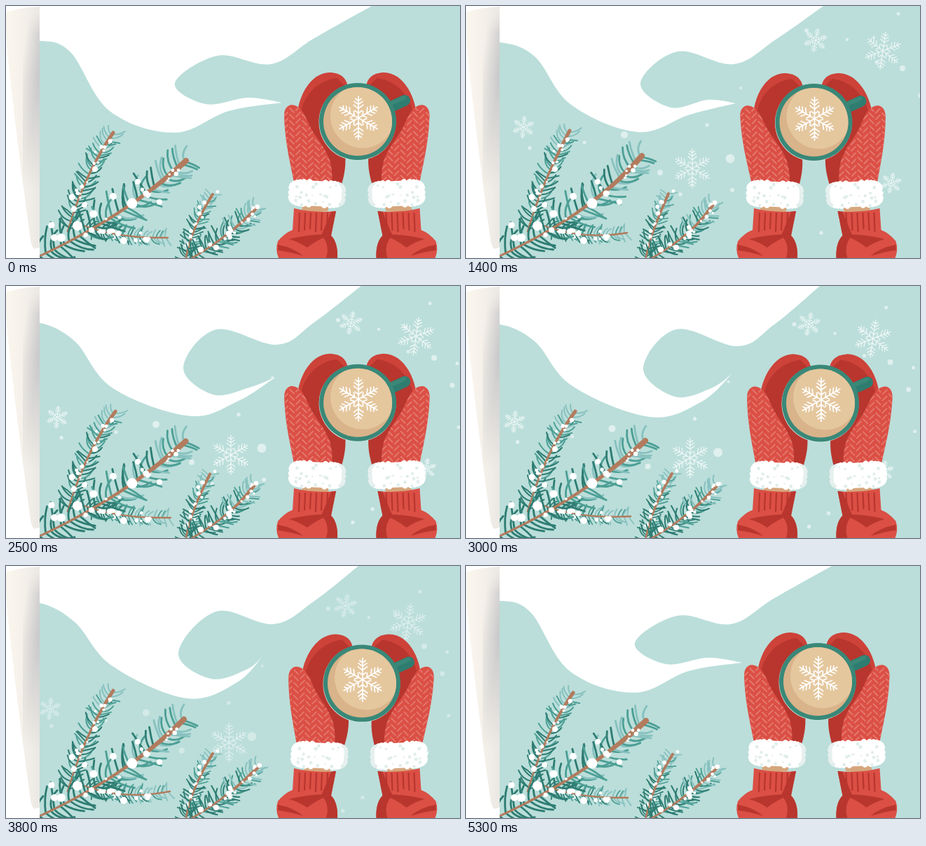
An HTML page with a canvas for the animation above (5.4 s loop, 648 by 360 pixels).

```html
<!DOCTYPE html>
<html lang="en">
<head>
<meta charset="utf-8">
<title>Winter cocoa</title>
<style>
html, body { margin: 0; width: 648px; height: 360px; overflow: hidden; background: #fff; }
canvas { display: block; }
</style>
</head>
<body>
<canvas id="stage" width="648" height="360"></canvas>
<script>
const ctx = document.getElementById('stage').getContext('2d');
const TAU = Math.PI * 2;
const SPAN = 5.3, LOOP = 5400, STEP = 100;
const TIMES = [0, 1.4, 2.1, 3, 3.8, 4.5];
const RED = '#db4f45', DARK_RED = '#b8362e', GREEN = '#398878';

// Steam outline: left y, lower edge, tip, upper edge, x where it leaves the top.
const STEAM = [
  [50, 92, 66, 148, 150, 240, 181, 318, 150, 394, 138, 345, 131, 285, 140, 241, 110, 302, 71, 378, 83, 440, 46, 522],
  [52, 98, 72, 150, 141, 245, 180, 320, 155, 385, 139, 345, 134, 292, 145, 249, 110, 302, 65, 382, 83, 442, 48, 510],
  [51, 98, 78, 152, 147, 258, 184, 325, 163, 388, 134, 345, 143, 292, 152, 252, 115, 300, 63, 385, 82, 440, 49, 508],
  [55, 98, 79, 152, 143, 262, 187, 335, 166, 380, 125, 350, 146, 298, 158, 253, 118, 300, 62, 388, 86, 440, 55, 505],
  [53, 98, 80, 152, 143, 258, 189, 330, 166, 369, 125, 345, 147, 292, 161, 246, 124, 300, 65, 382, 83, 440, 50, 503],
  [52, 98, 75, 148, 148, 250, 184, 322, 158, 377, 131, 335, 145, 285, 154, 244, 114, 295, 67, 380, 84, 440, 49, 508]
];
// Offsets (dx, dy): hands, then the tip of each branch.
const SWAY = [
  [0, 0, 0, 0, 0, 0, 0, 0, 0, 0, 0, 0],
  [-5.5, 1, -6, -7, -5, -3, -1, -7, -6, -1, -4, -6],
  [-3, 1.2, -1, 0, 2, -2, 3, 0, -6, 0, -4, -6],
  [4, 2.4, -1, 0, 3, -2, 4, -2, -1, -1, 1, -4],
  [6, 2.6, -3, -2, 0, -3, 3, -9, 0, -1, 3, -2],
  [3, 1.2, -2, -1, 0, -2, 2, -6, 0, -1, 1, -2]
];
// Curve, needle length, stroke, stem widths, needle pairs.
const BRANCHES = [
  { curve: [44, 359, 168, 302, 257, 221], len: 37, line: 2.8, stem: [3, 8], pairs: 33 },
  { curve: [88, 322, 112, 240, 153, 181], len: 23, line: 2, stem: [2.5, 5], pairs: 29 },
  { curve: [112, 314, 160, 332, 231, 331], len: 17, line: 1.8, stem: [2, 2.5], pairs: 26 },
  { curve: [256, 364, 264, 318, 295, 269], len: 17, line: 1.7, stem: [2.5, 4], pairs: 27 },
  { curve: [262, 362, 318, 330, 357, 289], len: 23, line: 2, stem: [2.5, 5], pairs: 28 }
];
const CLUMPS = [
  65, 313, 4.5, 79, 331, 6, 69, 331, 5, 102, 314, 7, 125, 297, 5.5, 112, 284, 4, 94, 273, 4.5,
  180, 282, 7.5, 200, 268, 4.5, 188, 251, 4, 153, 272, 5, 219, 280, 4, 160, 325, 4, 148, 322, 4,
  168, 335, 5, 122, 320, 4, 97, 290, 4, 127, 233, 4, 300, 345, 4, 278, 348, 4, 318, 325, 4
];
const FLAKES = [
  [595, 64, 27, -8.8, 7, .15], [499, 49, 17, -6, 3.3, .2], [323, 232, 28, -1.9, 8.5, 0],
  [82, 173, 16, -8, 13, .1], [607, 253, 15, -7, 7, .2]
];
const SPECKS = [
  486, 35, 3, 617, 11, 2.5, 544, 48, 2.2, 582, 45, 2, 623, 89, 4, 649, 128, 3.5, 377, 218, 6.5,
  226, 184, 5, 277, 238, 4, 380, 263, 3, 169, 195, 2.5, 91, 203, 2.7, 344, 170, 2.7, 392, 117, 2,
  507, 324, 2.7, 306, 269, 2.7, 658, 188, 2.5, 535, 305, 2.7, 656, 97, 2.5, 586, 80, 2.5
];

let seed = 7;
const random = (lo = 0, hi = 1) => {
  seed = (seed * 16807) % 2147483647;
  return lo + (hi - lo) * seed / 2147483647;
};

BRANCHES.forEach(b => {
  b.needles = [];
  for (let i = 0; i < b.pairs; i++) for (const side of [-1, 1]) {
    const s = (i + random()) / b.pairs, tone = s + random(-.4, .4);
    b.needles.push({
      s, side,
      len: b.len * random(.75, 1.1) * (1 - .25 * s * s),
      spread: (side < 0 ? 1.3 : 1) + random(-.2, .2),
      bend: random(-.1, .5),
      color: tone < .5 ? '#2d7c72' : tone < .85 ? '#4c9f95' : '#87c1bf'
    });
  }
  b.snow = Array.from({ length: 13 }, () =>
    ({ s: random(.25, 1), dx: random(-7, 7), dy: random(-6, 6), r: random(1.5, 3.4) }));
});
const fluff = Array.from({ length: 22 }, () => [random(412, 478), random(254, 284), random(1, 2.6)]);

// Smooth periodic interpolation of keyed number lists.
function track(keys, t) {
  const n = TIMES.length;
  const time = i => TIMES[(i + n) % n] + SPAN * Math.floor(i / n);
  const key = i => keys[(i + n) % n];
  let i = n - 1;
  while (TIMES[i] > t) i--;
  const h = time(i + 1) - time(i), u = (t - time(i)) / h;
  const slope = (k, j) => (key(k + 1)[j] - key(k - 1)[j]) / (time(k + 1) - time(k - 1)) * h;
  const e = u * u * (3 - 2 * u);
  return key(i).map((a, j) => a + (key(i + 1)[j] - a) * e +
    slope(i, j) * u * (1 - u) ** 2 - slope(i + 1, j) * u * u * (1 - u));
}

function fill(shape, color) {
  ctx.fillStyle = color;
  ctx.fill(typeof shape === 'string' ? new Path2D(shape) : shape);
}
function disc(x, y, r, color) {
  ctx.fillStyle = color;
  ctx.beginPath();
  ctx.arc(x, y, r, 0, TAU);
  ctx.fill();
}
function strokeLine(x1, y1, x2, y2) {
  ctx.beginPath();
  ctx.moveTo(x1, y1);
  ctx.lineTo(x2, y2);
  ctx.stroke();
}
function triples(list, draw) {
  for (let i = 0; i < list.length; i += 3) draw(list[i], list[i + 1], list[i + 2]);
}

// Curve through pts; the first and last points only set the end tangents.
function spline(pts) {
  for (let i = 1; i < pts.length - 2; i++) {
    const [a, b, c, d] = pts.slice(i - 1, i + 3);
    ctx.bezierCurveTo(b[0] + (c[0] - a[0]) / 5.7, b[1] + (c[1] - a[1]) / 5.7,
      c[0] - (d[0] - b[0]) / 5.7, c[1] - (d[1] - b[1]) / 5.7, c[0], c[1]);
  }
}

function drawSteam(t) {
  const v = track(STEAM, t), pts = [];
  for (let i = 1; i < 23; i += 2) pts.push([v[i], v[i + 1]]);
  const tip = pts[4], end = [v[23], 0];
  ctx.fillStyle = '#fff';
  ctx.beginPath();
  ctx.moveTo(48, 0);
  ctx.lineTo(48, v[0]);
  spline([[10, v[0] + 10], [48, v[0]], ...pts.slice(0, 5), tip]);
  spline([tip, ...pts.slice(4), end, end]);
  ctx.fill();
}

function drawFlake(x, y, r, turn, width) {
  ctx.save();
  ctx.translate(x, y);
  ctx.rotate(turn);
  ctx.strokeStyle = '#fff';
  ctx.lineWidth = width;
  ctx.beginPath();
  for (let arm = 0; arm < 6; arm++) {
    ctx.moveTo(0, 0);
    ctx.lineTo(0, -r);
    for (const [at, len] of [[.22, .2], [.44, .27], [.62, .24], [.79, .17]]) {
      ctx.moveTo(-r * len * .8, -r * (at + len * .6));
      ctx.lineTo(0, -r * at);
      ctx.lineTo(r * len * .8, -r * (at + len * .6));
    }
    ctx.rotate(TAU / 6);
  }
  ctx.stroke();
  ctx.restore();
}

function drawSnow(t) {
  const show = Math.max(0, Math.min(1, t / 1.5, (SPAN - t) / 2.3)), age = t - 1.4;
  ctx.globalAlpha = show * .75;
  FLAKES.forEach(([x, y, r, vx, vy, turn]) =>
    drawFlake(x + vx * age, y + vy * age, r, turn, r > 20 ? 1.3 : 1));
  ctx.globalAlpha = show * .55;
  const fall = t < 3 ? 12.4 * age : 19.8 + 7.3 * (t - 3);
  triples(SPECKS, (x, y, r) => disc(x - 10.9 * age, y + fall, r, '#fff'));
  ctx.globalAlpha = 1;
}

function drawBranch(b, dx, dy) {
  const [x0, y0, cx, cy, x1, y1] = b.curve;
  const point = s => {
    const q = 1 - s, w = s ** 3;
    return [q * q * x0 + 2 * q * s * cx + s * s * x1 + dx * w,
      q * q * y0 + 2 * q * s * cy + s * s * y1 + dy * w];
  };
  ctx.lineWidth = b.line;
  b.needles.forEach(n => {
    const [x, y] = point(n.s), [fx, fy] = point(n.s + .02);
    const dir = Math.atan2(fy - y, fx - x), a = dir + n.side * (n.spread - n.bend);
    const out = dir + n.side * (n.spread + n.bend * .4);
    ctx.strokeStyle = n.color;
    ctx.beginPath();
    ctx.moveTo(x, y);
    ctx.quadraticCurveTo(x + Math.cos(out) * n.len * .55, y + Math.sin(out) * n.len * .55,
      x + Math.cos(a) * n.len, y + Math.sin(a) * n.len);
    ctx.stroke();
  });
  ctx.strokeStyle = '#b27b5e';
  for (let i = 0; i < 16; i++) {
    ctx.lineWidth = b.stem[0] + (b.stem[1] - b.stem[0]) * (i / 15) ** 2;
    strokeLine(...point(i / 16), ...point((i + 1) / 16));
  }
  b.snow.forEach(d => {
    const [x, y] = point(d.s);
    disc(x + d.dx, y + d.dy, d.r, '#fff');
  });
}

function drawSleeve() {
  fill('M411 289Q440 296 471 293L464 328Q474 338 473 360L389 360Q384 348 388 336Q398 324 409 320Z', RED);
  fill('M464 294L471 293L464 328Q474 338 473 360L457 360Q463 340 450 328Z', DARK_RED);
  fill('M404 333Q430 326 464 326Q444 334 430 345Q418 337 404 333Z', DARK_RED);
  fill('M388 341Q410 345 424 357Q404 351 388 349Z', DARK_RED);
  ctx.strokeStyle = DARK_RED;
  ctx.lineWidth = 2.2;
  for (let x = 419; x < 462; x += 8) strokeLine(x, 296, x - 1, 318 + (x % 3) * 2);
}

const thumb = new Path2D('M397 156C397 144 405 139 412 142C424 146 428 160 434 172' +
  'C442 188 456 202 462 220C466 234 466 246 465 258L412 258C409 236 398 200 397 156Z');

function drawMitten() {
  fill('M424 284L461 286L459 293Q440 296 422 291Z', '#d6a67c');
  fill('M415 175C412 130 436 93 464 95C478 96 485 103 487 112L470 200Z', '#cd4239');
  fill('M420 168C418 135 440 107 472 103L490 120L484 212C486 232 481 248 477 262L440 262Z', DARK_RED);
  fill(thumb, RED);
  ctx.save();
  ctx.clip(thumb);
  ctx.strokeStyle = '#e4776c';
  ctx.lineWidth = 2;
  for (let col = 0; col < 8; col++) for (let row = 0; row < 14; row++) {
    const x = 399 + col * 9, y = 146 + row * 9 + (col % 2) * 3, tilt = col % 2 ? 3 : -3;
    strokeLine(x - 3, y - tilt, x + 3, y + tilt);
  }
  ctx.restore();
  ctx.save();
  ctx.translate(444, 268);
  ctx.rotate(.05);
  for (let i = 0; i < 34; i++) {
    const a = i / 34 * TAU, px = Math.sign(Math.cos(a)) * Math.abs(Math.cos(a)) ** .5;
    const py = Math.sign(Math.sin(a)) * Math.abs(Math.sin(a)) ** .5;
    disc(px * 37, py * 16, 4.4, px > .85 ? '#e6f0ee' : '#fff');
  }
  ctx.beginPath();
  ctx.roundRect(-37, -18, 72, 36, 13);
  ctx.fillStyle = '#fff';
  ctx.fill();
  ctx.restore();
  fluff.forEach(([x, y, r]) => disc(x, y, r, '#e0edeb'));
}

function bothSides(draw) {
  draw();
  ctx.save();
  ctx.translate(1001.5, 0);
  ctx.scale(-1, 1);
  draw();
  ctx.restore();
}

function drawCup(dx, dy) {
  ctx.save();
  ctx.translate(dx, dy);
  ctx.strokeStyle = '#2f7d70';
  ctx.lineWidth = 16;
  strokeLine(545, 146, 569, 135);
  ctx.strokeStyle = GREEN;
  ctx.lineWidth = 6;
  strokeLine(550, 139, 568, 131);
  disc(501.5, 165.8, 55, '#d5e6df');
  disc(502, 165, 55, GREEN);
  disc(502, 165, 49, '#d9b38a');
  ctx.save();
  ctx.beginPath();
  ctx.arc(502, 165, 49, 0, TAU);
  ctx.clip();
  disc(509, 157, 46, '#e5c79e');
  ctx.restore();
  drawFlake(503, 160, 31, 0, 1.7);
  ctx.restore();
}

function drawHands(dx, dy) {
  const lean = -dx / 235;
  ctx.save();
  ctx.transform(1, 0, lean, 1, -lean * 400, dy);
  bothSides(drawMitten);
  ctx.restore();
  bothSides(drawSleeve);
  drawCup(dx, dy);
}

function drawRoll() {
  ctx.fillStyle = '#fff';
  ctx.fillRect(0, 0, 48, 360);
  const roll = 'M0 9Q20 2 48 1L48 345L41 347Q37 346 35 334C26 270 5 110 0 40Z';
  const paper = ctx.createLinearGradient(0, 0, 48, 0);
  paper.addColorStop(0, '#fbf6ee');
  paper.addColorStop(.5, '#f5f1ea');
  paper.addColorStop(1, '#ebe8e4');
  fill(roll, paper);
  const shade = ctx.createLinearGradient(22, 80, 50, 84);
  shade.addColorStop(0, 'rgba(195,195,197,0)');
  shade.addColorStop(1, 'rgba(195,195,197,.85)');
  // Fade the shadow in at the top and out towards the bottom.
  for (let y = 8; y < 260; y += 2) {
    ctx.globalAlpha = Math.min(1, (y - 8) / 30, (260 - y) / 160);
    ctx.fillStyle = shade;
    ctx.fillRect(24, y, 24, 2);
  }
  ctx.globalAlpha = 1;
}

function draw(t) {
  const sway = track(SWAY, t);
  ctx.lineCap = 'round';
  ctx.fillStyle = '#bbdeda';
  ctx.fillRect(0, 0, 648, 360);
  drawSnow(t);
  drawSteam(t);
  for (const i of [1, 2, 0, 3, 4]) drawBranch(BRANCHES[i], sway[2 + 2 * i], sway[3 + 2 * i]);
  triples(CLUMPS, (x, y, r) => disc(x, y, r, '#fff'));
  drawHands(sway[0], sway[1]);
  drawRoll();
}

function tick() {
  const ms = performance.now() % LOOP;
  draw(Math.floor(ms / STEP) * STEP / 1000);
  requestAnimationFrame(tick);
}
tick();
</script>
</body>
</html>
```
